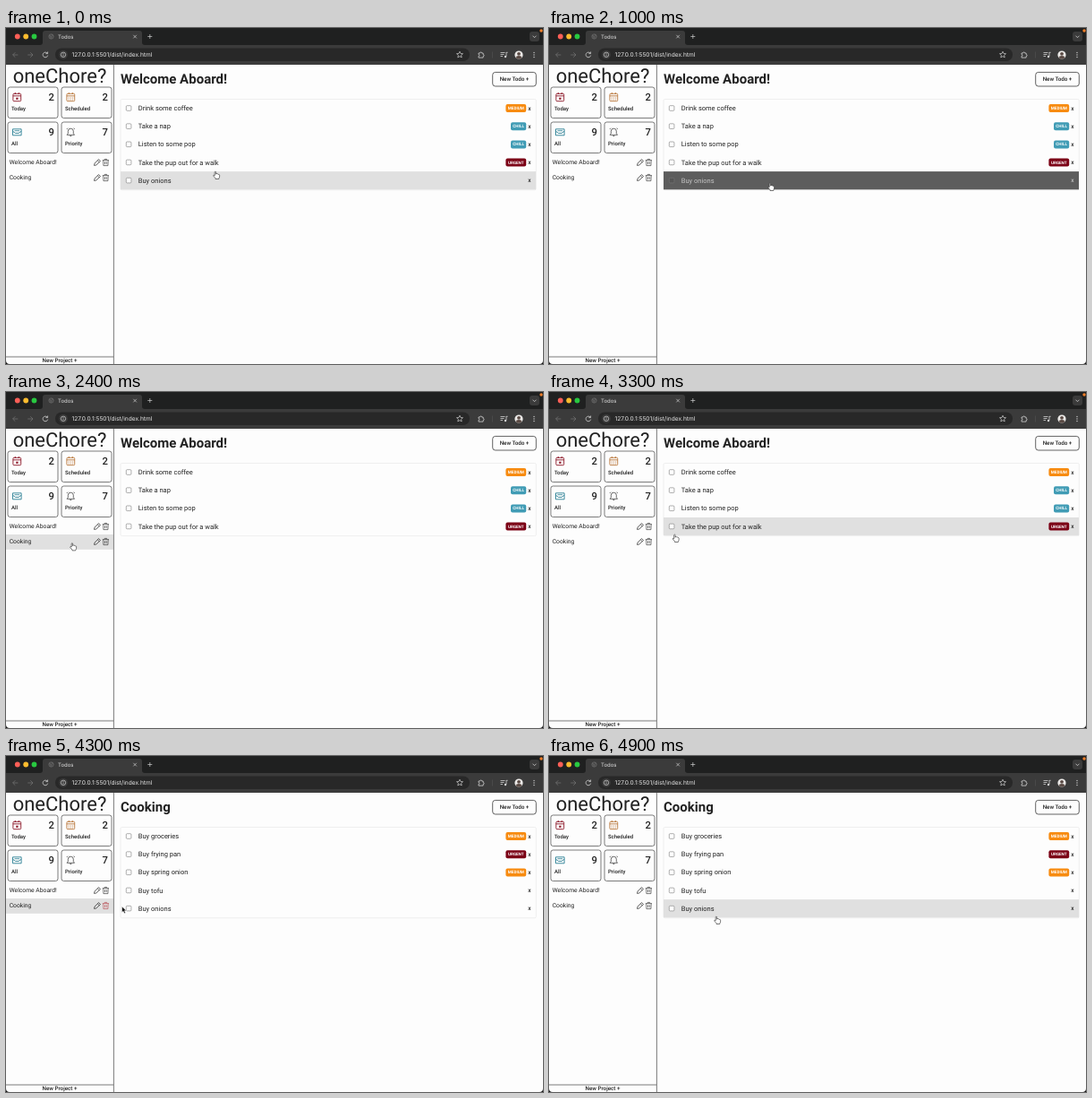
An HTML page for the animation above (5000 ms loop, 600 px wide and 375 px high).

```html
<!DOCTYPE html>
<html lang="en">
<head>
<meta charset="utf-8">
<title>Todos</title>
<style>
html, body { margin: 0; width: 100%; height: 100%; overflow: hidden; background: #111; }
svg { display: block; width: 600px; height: 375px; border-radius: 0 0 4px 4px;
  font-family: Roboto, sans-serif; text-rendering: geometricPrecision; }
.ui { font-family: Inter, sans-serif; }
</style>
</head>
<body>
<svg id="stage" viewBox="0 0 600 375"></svg>
<script>
const LOOP = 5000, STEP = 100, INK = '#222';
const PRESS = 700, DRAG = 1100, OVER = 1300, DROP = 1900, OPEN = 4200;

const BADGES = {
  MEDIUM: [558.4, '#f78b10'], CHILL: [564, '#419cb5'], URGENT: [558.4, '#7c0317']
};
const WELCOME = [['Drink some coffee', 'MEDIUM'], ['Take a nap', 'CHILL'], ['Listen to some pop', 'CHILL'],
  ['Take the pup out for a walk', 'URGENT'], ['Buy onions']];
const COOKING = [['Buy groceries', 'MEDIUM'], ['Buy frying pan', 'URGENT'], ['Buy spring onion', 'MEDIUM'],
  ['Buy tofu'], ['Buy onions']];

// Pointer tip: time, x, y
const PATH = [[0, 234, 160], [100, 234, 160], [600, 247, 173], [1000, 247, 173], [1100, 225, 172],
  [1200, 165, 170], [1300, 100, 168], [1400, 75.5, 168], [1900, 75.5, 168], [2000, 74, 168.4],
  [3000, 74, 168.4], [3100, 87, 167], [3300, 140.5, 159], [3500, 150, 150], [3600, 148, 151],
  [3800, 118, 158], [4100, 76, 164], [4200, 100, 166], [4300, 129.5, 168], [4500, 148, 156],
  [4700, 166, 158], [4900, 187, 179], [5000, 187, 179]];

const clamp = v => Math.max(0, Math.min(1, v));
const mix = (a, b, k) => a + (b - a) * k;
const gray = v => `rgb(${Array(3).fill(Math.round(v))})`;
const fade = (t, from, to, ms = 200) => Math.min(clamp((t - from) / ms), 1 - clamp((t - to) / ms));

function pointer(t) {
  const i = PATH.findIndex(p => p[0] > t), a = PATH[i - 1], b = PATH[i];
  const k = (t - a[0]) / (b[0] - a[0]);
  return [mix(a[1], b[1], k), mix(a[2], b[2], k)];
}

const text = (x, y, s, size, extra = '', fill = INK) =>
  `<text x="${x}" y="${y}" font-size="${size}" fill="${fill}" ${extra}>${s}</text>`;
const rect = (x, y, w, h, fill, extra = '') =>
  `<rect x="${x}" y="${y}" width="${w}" height="${h}" fill="${fill}" ${extra}/>`;
const dot = (x, y, r, fill, extra = '') => `<circle cx="${x}" cy="${y}" r="${r}" fill="${fill}" ${extra}/>`;
const line = (d, stroke = INK, width = 0.8, extra = '') =>
  `<path d="${d}" fill="none" stroke="${stroke}" stroke-width="${width}" ${extra}/>`;
const at = (x, y, body, extra = '') => `<g transform="translate(${x} ${y})" ${extra}>${body}</g>`;
const MED = 'font-weight="500"', BOLD = 'font-weight="700"';
const MID = 'text-anchor="middle"', END = 'text-anchor="end"';

function browser() {
  const pale = '#d2d2d2', dim = '#777';
  return rect(0, 0, 600, 20, '#1f2020') + rect(0, 19, 600, 22, '#3b3b3b') +
    '<path d="M38 19q3 0 3-3V6q0-3 3-3h105q3 0 3 3v10q0 3 3 3z" fill="#3b3b3b"/>' +
    dot(12.8, 9.5, 2.9, '#fe5f57') + dot(22.2, 9.5, 2.9, '#febc2e') + dot(31.5, 9.5, 2.9, '#28c840') +
    dot(50.5, 9.5, 2.7, '#4a4a4a', 'stroke="#777" stroke-width=".5"') +
    line('M48 8.5l2.5 1-.5 2.5M51 7l2 2', '#777', 0.5) +
    text(58, 11.7, 'Todos', 6, 'class="ui"', '#e4e4e4') +
    line('M142.3 7.8l3.6 3.6m0-3.6l-3.6 3.6M158.3 9.5h5m-2.5-2.5v5', pale, 0.7) +
    rect(585, 4, 11, 11, '#3b3b3b', 'rx="3"') + line('M588.5 8.7l2 2 2-2', pale) +
    dot(598, 3, 1.7, '#f5802a') +
    line('M13.3 30H7.6m2.7-2.7L7.6 30l2.7 2.7', dim, 0.7) +
    line('M24.3 30h5.7m-2.7-2.7L30 30l-2.7 2.7', dim, 0.7) +
    line('M46 28a2.8 2.8 0 1 0 .7 2.6M46.6 26.5v2.1h-2.1', pale, 0.8) +
    rect(55, 22.5, 463, 14.5, '#282828', 'rx="7.2"') +
    dot(64, 29.8, 4.9, '#3b3b3b') + dot(64, 29.8, 2.7, 'none', `stroke="${pale}" stroke-width=".7"`) +
    line('M64 29.5v1.8M64 28v.8', pale, 0.7) +
    text(73.5, 32.1, '127.0.0.1:5501/dist/index.html', 6.6, 'class="ui"', '#e8e8e8') +
    line('M507 26.2l1 2.3 2.5.2-1.9 1.7.6 2.5-2.2-1.3-2.2 1.3.6-2.5-1.9-1.7 2.5-.2z', pale, 0.7) +
    line('M528 28h1.6a1 1 0 0 1 2 0h1.5v1.6a1 1 0 0 1 0 2v1.5H528v-1.6a1 1 0 0 0 0-2z', pale, 0.8) +
    line('M543.5 26.5v7', '#555', 0.6) +
    line('M552.5 27.5h5m-5 2h4m-4 2h2.5m4-4.5v4.6m0-4.3h1.6', pale, 0.8) + dot(558, 32, 1.2, pale) +
    dot(573, 30, 4.6, '#eceae8') + dot(573, 28.8, 1.9, '#5a4a44') +
    '<path d="M569.8 33.2q0-2.2 3.2-2.2t3.2 2.2q-3.2 2.4-6.4 0z" fill="#5a4a44"/>' +
    dot(590, 27.5, 0.7, pale) + dot(590, 30, 0.7, pale) + dot(590, 32.5, 0.7, pale);
}

const calendar = color => rect(-4.4, -3.7, 8.8, 8.4, 'none', `rx="1" stroke="${color}" stroke-width=".9"`) +
  line('M-4.4-1.2h8.8M-2-5v2M2-5v2', color, 0.9);
const ICONS = [
  calendar('#8c1626') + rect(-1, 0.7, 2.2, 2.2, '#8c1626'),
  calendar('#b9773a') + line('M-2.6 1h5.4M-2.6 3h5.4', '#b9773a', 0.9, 'stroke-dasharray="1 1.2"'),
  line('M-4.8-3.2h9.6v7h-9.6zM-4.8-.8l3 2.2h3.6l3-2.2', '#2a7f95', 0.9) + line('M-2.8-1.3h5.6', '#2a7f95'),
  line('M-4.2 3.3h8.4l-1.2-1.6v-2.5a3 3 0 0 0-6 0v2.5zM-1 4.5h2M-4.5-3l1.2-1.3M4.5-3L3.3-4.3', '#444')
];
const pencil = line('M-3.5 3.4l.5-2.3 4.6-4.5 1.9 1.9-4.7 4.5zM.4-2.2l1.9 1.9', INK, 0.7);
const trash = color =>
  line('M-3.6-2.4h7.2M-1.2-2.5v-1.1h2.4v1.1M-2.8-2.3l.3 5.9h5l.3-5.9M-.9-.9v3M.9-.9v3', color, 0.6);

function sidebar(t) {
  const cards = [['Today', 2], ['Scheduled', 2], ['All', 9], ['Priority', 7]].map(([label, n], i) =>
    at(2 + i % 2 * 60, i < 2 ? 66 : 105,
      rect(0, 0, 56, 34.5, '#fdfdfd', 'rx="2.5" stroke="#444" stroke-width=".7"') + at(10.3, 11, ICONS[i]) +
      text(4, 26.3, label, 6, MED) + text(52, 15, n, 11.25, `${MED} ${END}`)));
  const hover = Math.max(t >= DROP ? fade(t, DROP - 200, 3050) : 0, fade(t, 3750, 4300));
  const red = fade(t, 4150, 4400);
  const target = t >= OVER && t < DROP
    ? rect(0.5, 159.5, 119.5, 17, '#f2f8f3', 'stroke="#3f9a5c" stroke-width=".7" stroke-dasharray="1 1"') : '';
  const project = (name, y, color) =>
    text(3.7, y + 2.4, name, 6.75) + at(102, y, pencil) + at(111.4, y, trash(color));
  return text(60, 61, 'oneChore?', 22, MID) + cards.join('') +
    rect(0, 159, 120, 16.8, '#e0e0e0', `opacity="${hover}"`) + target +
    project('Welcome Aboard!', 150, INK) +
    project('Cooking', 167, `rgb(${mix(34, 230, red)},${mix(34, 70, red)},${mix(34, 78, red)})`) +
    line('M120.4 40v335M0 367h120', INK, 0.6) +
    text(60, 373.2, 'New Project +', 6.25, `${MED} ${MID}`);
}

// One list row, placed by its top edge; dark runs from 0 (hover) to 1 (pressed)
function row([label, badge], y, hover, dark = 0) {
  const ink = gray(mix(34, 255, clamp(dark * 2 - 0.7)));
  const [x, color] = BADGES[badge] || [];
  return at(128, y,
    rect(0, 0, 464, 20.2, gray(mix(224, 42, dark)), `opacity="${hover}"`) +
    rect(6.3, 7.2, 5.6, 5.6, dark > 0.6 ? '#555' : '#fff', 'rx="1" stroke="#777" stroke-width=".6"') +
    text(19.8, 12.7, label, 7.5, '', ink) +
    (badge ? rect(x - 128, 5.6, 581.2 - x, 9, color, 'rx="2"') +
      text((x + 581.2) / 2 - 128, 11.7, badge, 4.6, `${MID} ${BOLD}`, '#fff') : '') +
    text(456.8, 12.4, 'x', 6.5, `${MED} ${MID}`, ink));
}

function main(t) {
  const cooking = t >= OPEN;
  const items = cooking ? COOKING : t < DROP ? WELCOME : WELCOME.slice(0, 4);
  const dark = t < DROP ? clamp((t - PRESS + 10) / 400) ** 1.3 : 0;
  const hovers = [0, 0, 0, cooking ? fade(t, 4350, 4700) : fade(t, 3100, 3700),
    cooking ? fade(t, 4700, 9999) : 1];
  const height = items.length * 20.15;
  return text(128, 62.2, cooking ? 'Cooking' : 'Welcome Aboard!', 15, BOLD) +
    rect(543.7, 49.4, 48.6, 15.6, '#fdfdfd', `rx="3" stroke="${INK}" stroke-width=".7"`) +
    text(568, 59.4, 'New Todo +', 6.25, `${MED} ${MID}`) +
    rect(128, 79.5, 464.3, height + 0.5, '#fdfdfd', 'rx="1.5" stroke="#e6e6e6" stroke-width=".6"') +
    (dark > 0.9 ? rect(128, 161, 464, 21, '#000', 'opacity=".2" rx="1"') : '') +
    items.map((item, i) => row(item, 79.5 + i * 20.15, hovers[i], i === 4 ? dark : 0)).join('');
}

function cursor(t, x, y) {
  const dragging = t >= DRAG && t < DROP;
  const arrow = '<path d="M0 0v6.6l1.6-1.4 1.1 2.5 1.3-.6-1.1-2.4h2.1z" fill="#111" stroke="#fff" stroke-width=".5"/>';
  const hand = '<path d="M-.8.6q.7-1 1.4 0v2.6l.3-.6q.9-.3 1.2.4.9-.4 1.3.4 1-.2 1.2.7v1.8q0 1.1-.8 1.9v.7H0V7.6L-2.3 5q-.1-1.1 1-.8l.5.5z" fill="#fff" stroke="#222" stroke-width=".6"/>';
  const plus = dot(4.5, 10.5, 4.2, '#2fa52f') + line('M2.2 10.5h4.6M4.5 8.2v4.6', '#fff', 1.1);
  const ghost = dragging ? at(x - 249.5, y - 173.3,
    rect(128, 161, 464, 21, '#000', 'opacity=".2"') + row(WELCOME[4], 160.1, 1, 1), 'opacity=".88"') : '';
  const usesArrow = dragging || t >= 4250 && t < 4400;
  return ghost + at(x, y, usesArrow ? arrow + (dragging ? plus : '') : hand);
}

const stage = document.getElementById('stage');
const chrome = browser();
let shown = -1;

function draw(now) {
  const t = Math.floor(now % LOOP / STEP) * STEP;
  if (t !== shown) {
    shown = t;
    stage.innerHTML = rect(0, 0, 600, 375, '#fdfdfd') + sidebar(t) + main(t) + chrome + cursor(t, ...pointer(t));
  }
  requestAnimationFrame(draw);
}
draw(performance.now());
</script>
</body>
</html>
```
